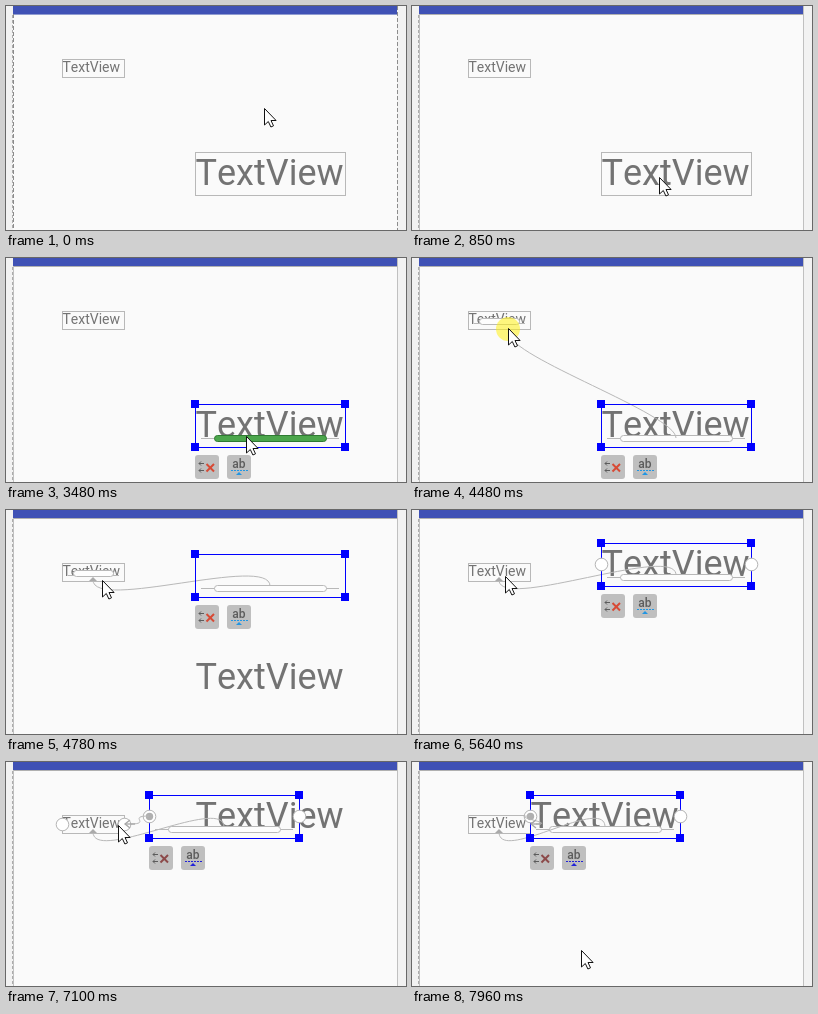
An HTML page with a canvas that plays this animation: 400 by 224 pixels, repeating every 8 s.

```html
<!DOCTYPE html>
<html lang="en">
<head>
<meta charset="utf-8">
<title>Constraint editor</title>
<style>
html, body { margin: 0; width: 100%; height: 100%; overflow: hidden; background: #f2f2f2; }
canvas { display: block; width: 400px; height: 224px; }
</style>
</head>
<body>
<canvas id="stage" width="400" height="224"></canvas>
<script>
const g = document.getElementById('stage').getContext('2d');
const LOOP = 8000, STEP = 77.2;
const BLUE = '#0000ff', LINE = '#b8b8b8', TEXT = '#737373';

// Pointer path: step, x, y
const path = [
  [0, 259, 103], [3, 259, 103], [8, 265, 154], [9, 265, 154], [11, 248, 172],
  [23, 248, 172], [24, 252, 171], [25, 259, 168], [30, 223, 205], [37, 223, 205],
  [38, 233, 191], [39, 241, 177], [44, 241, 177], [45, 241, 179], [51, 241, 179],
  [54, 186, 140], [57, 103, 78], [58, 97, 71], [72, 97, 71], [73, 94, 67],
  [78, 140, 76], [83, 192, 54], [86, 192, 54], [89, 113, 64], [97, 113, 64],
  [100, 150, 140], [103, 170, 189]
];

function pointer(n) {
  const i = path.findIndex(p => p[0] >= n);
  if (i < 0) return path[path.length - 1].slice(1);
  if (i === 0) return path[0].slice(1);
  const [a, ax, ay] = path[i - 1], [b, bx, by] = path[i];
  const p = (n - a) / (b - a);
  return [ax + (bx - ax) * p, ay + (by - ay) * p];
}

function ease(n, from, to) {
  const p = Math.min(1, Math.max(0, (n - from) / (to - from)));
  return (1 - Math.cos(Math.PI * p)) / 2;
}

function rect(x, y, w, h, color) {
  g.fillStyle = color;
  g.fillRect(x, y, w, h);
}

function stroke(color, width = 1) {
  g.strokeStyle = color;
  g.lineWidth = width;
  g.stroke();
}

function line(points, color, width, dash = []) {
  g.beginPath();
  points.forEach(([x, y]) => g.lineTo(x, y));
  g.setLineDash(dash);
  stroke(color, width);
  g.setLineDash([]);
}

function poly(points, fill) {
  g.beginPath();
  points.forEach(([x, y]) => g.lineTo(x, y));
  g.closePath();
  g.fillStyle = fill;
  g.fill();
}

function disc(x, y, r, fill, edge, width) {
  g.beginPath();
  g.arc(x, y, r, 0, 7);
  g.fillStyle = fill;
  g.fill();
  if (edge) stroke(edge, width);
}

function round(x, y, w, h, r, fill, edge) {
  g.beginPath();
  g.roundRect(x, y, w, h, r);
  g.fillStyle = fill;
  g.fill();
  if (edge) stroke(edge);
}

function curve(x1, y1, x2, y2, pull) {
  g.beginPath();
  g.moveTo(x1, y1);
  g.bezierCurveTo(x1, y1 - pull, x2, y2 + pull, x2, y2);
  stroke(LINE);
}

function label(x, y, size) {
  g.font = size + 'px Roboto, sans-serif';
  g.fontKerning = 'none';
  g.textAlign = 'left';
  g.fillStyle = TEXT;
  g.fillText('TextView', x, y);
}

function frame(x, y, w, h, color) {
  g.strokeStyle = color;
  g.lineWidth = 1;
  g.strokeRect(x + .5, y + .5, w, h);
}

function screen(hover) {
  const edge = hover ? '#8c8c8c' : '#c0c0c0', dash = hover ? [4, 2] : [];
  rect(0, 0, 400, 224, '#f2f2f2');
  rect(7, 0, 384, 224, '#fafafa');
  rect(7, 0, 384, 8, '#3f51b5');
  line([[7, 8.5], [391, 8.5]], hover ? '#8f9bd0' : '#b0b0b0');
  line([[7.5, 8], [7.5, 224]], edge, 1, dash);
  line([[391.5, 0], [391.5, 224]], edge, 1, dash);
  line([[6.5, 9], [6.5, 224]], '#acacac', 1, [3, 2]);
}

function buttons(x, y, pressed, late) {
  const grey = '#5c5c5c';
  round(x, y, 24, 24, 3, '#bfbfbf');
  for (const [dx, dy] of [[4, 8], [4, 15]]) {
    line([[x + dx, y + dy + .5], [x + dx + 5, y + dy + .5]], grey, 1);
    line([[x + dx + 2, y + dy - 1.5], [x + dx, y + dy + .5], [x + dx + 2, y + dy + 2.5]], grey, 1);
  }
  const red = late ? '#8c4a4a' : '#d84a35';
  line([[x + 11.5, y + 9], [x + 19, y + 16.5]], red, 2);
  line([[x + 19, y + 9], [x + 11.5, y + 16.5]], red, 2);

  round(x + 32, y, 24, 24, 3, pressed ? '#a6a6a6' : '#bfbfbf');
  g.font = '500 12px Roboto, sans-serif';
  g.textAlign = 'center';
  g.fillStyle = grey;
  g.fillText('ab', x + 44, y + 13);
  const blue = late ? '#2323d8' : '#2196e3';
  line([[x + 36, y + 15.5], [x + 53, y + 15.5]], blue, 1, [2, 1]);
  poly([[x + 41, y + 20], [x + 44, y + 17], [x + 47, y + 20]], blue);
}

function handle(x, y) {
  disc(x + .5, y + .5, 6.3, '#fff', '#b4b4b4', 1);
}

function selection(x, y) {
  frame(x, y, 150, 43, BLUE);
  for (const cx of [x, x + 150])
    for (const cy of [y, y + 43]) rect(cx - 4, cy - 4, 8, 8, BLUE);
}

function bar(x, y, n) {
  line([[x + 6, y + 34.5], [x + 144, y + 34.5]], LINE);
  const hot = n >= 45 && n < 49;
  const fill = hot ? ['#4ca64c', '#44a044', '#3c983c', '#3c983c'][n - 45] : '#fdfdfd';
  round(x + 19.5, y + 31.5, 112, 6, 3, fill, hot ? '#2f7a32' : LINE);
}

function arrow(x, y) {
  line([[x, y], [x + 10, y]], '#a6a6a6', 1.3);
  line([[x + 5, y - 4], [x, y], [x + 5, y + 4]], '#a6a6a6', 1.3);
}

function cursor(x, y) {
  const shape = [[0, 0], [0, 16.5], [3.8, 13], [6.4, 18.5], [9, 17.3], [6.5, 12], [11.6, 12]];
  poly(shape.map(([a, b]) => [x + a - .5, y + b - .5]), '#fff');
  stroke('#111');
}

function draw(n) {
  const [px, py] = pointer(n);
  const x = 189 - Math.round(71 * ease(n, 89, 94));
  const y = 146 - Math.round(113 * ease(n, 58, 63));
  const textX = n < 95 ? 189 : 118, textY = n < 65 ? 146 : 33;
  const selected = n >= 13, baseline = n >= 34, late = n >= 90;
  const linked = n >= 59;

  screen(n < 7 || (n > 75 && n < 83));

  frame(56, 53, 62, 18, LINE);
  label(56.5, 66, 14);
  if (n >= 49 && n < 65) {
    line([[62, 65.5], [113, 65.5]], LINE);
    round(67.5, 60.5, 40, 6, 3, '#fdfdfd', LINE);
  }

  if (!selected) frame(189, 146, 150, 43, LINE);
  label(textX + .5, textY + 33.4, 36);

  if (baseline) bar(x, y, n);
  if (n >= 52 && !linked) curve(x + 75, y + 34, px, py + 4, 24);
  if (linked) {
    curve(x + 75, y + 32, 87, 70, 32);
    poly([[83, 71], [87, 67], [91, 71]], '#aaa');
  }

  if (selected) {
    selection(x, y);
    buttons(x, y + 51, n === 32 || n === 33, late);
    if (!baseline || n >= 65) {
      handle(x, y + 21);
      handle(x + 150, y + 21);
    }
    if (!baseline) {
      handle(x + 75, y);
      handle(x + 75, y + 43);
    }
  }

  if (n >= 87 && n < 95) {
    handle(56, 62);
    handle(118, 62);
  }
  if (n >= 84 && n < 90) {
    const r = Math.min(10, 6.5 + (n - 83) * 1.2);
    disc(x + .5, y + 21.5, r, '#14901c', '#0c6c14', 1.2);
    disc(x + .5, y + 21.5, r - 3.5, '#14901c', '#0c6c14', 1.2);
  }
  if (n >= 87 && n < 90) line([[x, y + 21], [px, py]], LINE);
  if (late) {
    disc(x + .5, y + 21.5, 3.7, '#b0b0b0');
    g.beginPath();
    g.moveTo(x, y + 21);
    g.bezierCurveTo(x - 22, y + 21, 146, 62, 124, 62);
    stroke(LINE);
    arrow(119, 62);
  }

  if ((n >= 49 && n < 59) || (n >= 87 && n < 90)) disc(px - 1, py, 12, 'rgba(255, 240, 20, .55)');
  cursor(px, py);
}

function tick(now) {
  draw(Math.floor((now % LOOP + 10) / STEP));
  requestAnimationFrame(tick);
}
requestAnimationFrame(tick);
</script>
</body>
</html>
```
